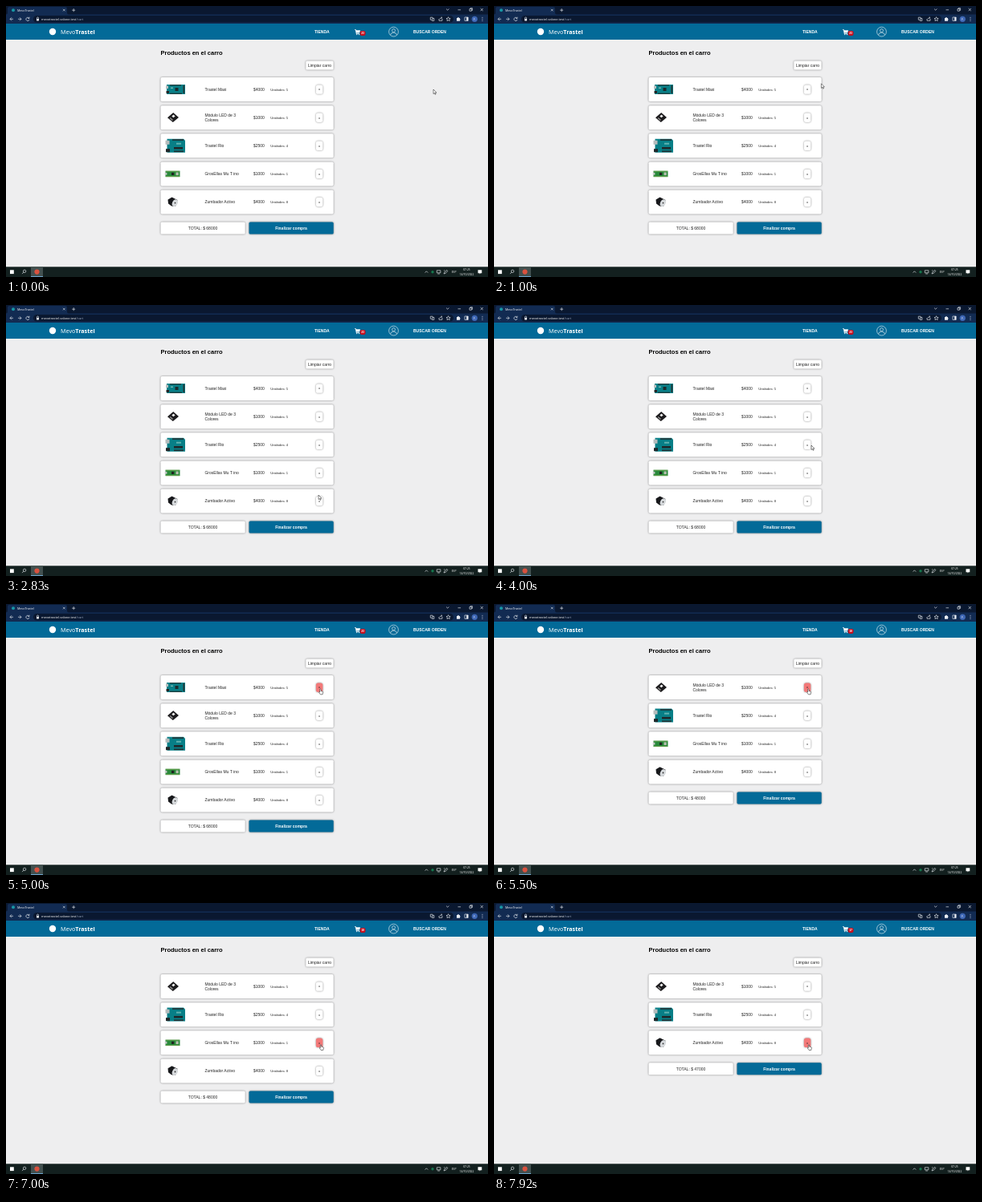
Write an HTML page that moves like this. It is 600x338 px and loops after 8 s.

```html
<!DOCTYPE html>
<html lang="es">
<head>
<meta charset="utf-8">
<title>Carro</title>
<style>
  html, body { margin: 0; height: 100%; overflow: hidden; background: #eeeeef; }
  svg { display: block; width: 100vw; height: 100vh; font: 5px "Liberation Sans", Arial, sans-serif; }
  text { white-space: pre; }
  .ui { font-family: "Open Sans", "Noto Sans", sans-serif; font-size: 3.7px; fill: #fff; }
  .bold { font-weight: 700; }
  .mid { text-anchor: middle; }
  .card { fill: #fff; filter: drop-shadow(0 0 .9px #0007); }
  .line { fill: none; stroke: #e8ecf2; stroke-width: .65; }
</style>
</head>
<body>
<svg viewBox="0 0 600 338">
  <rect width="600" height="338" fill="#eeeeef"/>

  <!-- browser -->
  <rect width="600" height="11" fill="#0a1830"/>
  <path d="M0 10.5Q2 10.5 2 8.5V3Q2 1 4 1H74Q76 1 76 3V8.5Q76 10.5 78 10.5H600V22H0Z" fill="#122b52"/>
  <rect x="34" y="12" width="523" height="8.6" rx="4.3" fill="#0a1830"/>
  <circle cx="9" cy="5.2" r="2" fill="#1896a5"/>
  <text class="ui" x="14" y="6.6">MevoTrastel</text>
  <text class="ui" x="44" y="17.7" font-size="4" style="font-size:4px">mevotrastel.volane.test<tspan fill="#9aa7bd">/cart</tspan></text>
  <g class="line">
    <path d="M71 3.8l2.6 2.6m0-2.6l-2.6 2.6M82.2 5.2h4m-2-2v4"/>
    <path d="M548 3.6l1.7 1.6 1.7-1.6M562.5 4.8h3.6M577 3.6h2.6v2.6H577zM578 3.5v-.8h2.6v2.7h-.9M590.7 3l3.2 3.2m0-3.2l-3.2 3.2"/>
    <path d="M9 16.3H5m2-2l-2 2 2 2M15 16.3h4m-2-2l2 2-2 2M28.6 15.1a2.1 2.1 0 1 0 .4 1.8M29 13.7v1.8h-1.8"/>
    <path d="M38.5 16v-1a1 1 0 0 1 2 0v1"/>
    <path d="M528.3 14.2h2.7v3h-2.7zM531 15.4h1.9v3h-3M539 16v2.3h4V16M540 16.4q.3-1.8 2.8-1.8m-1-1.1l1.2 1.1-1.2 1.1"/>
    <path d="M550.6 13.7l.8 1.7 1.8.2-1.4 1.2.4 1.8-1.6-.9-1.6.9.4-1.8-1.4-1.2 1.8-.2z"/>
    <path d="M571 14h4.2v4.4H571z"/>
  </g>
  <g fill="#e8ecf2">
    <rect x="38" y="15.9" width="3" height="2.5" rx=".4"/>
    <path d="M561 14.9h1.1a.9.9 0 0 1 1.8 0h1.1v1.2a.9.9 0 0 1 0 1.6v1h-4z"/>
    <rect x="573.2" y="14" width="2" height="4.4"/>
    <circle cx="593" cy="14.3" r=".5"/><circle cx="593" cy="16.3" r=".5"/><circle cx="593" cy="18.3" r=".5"/>
  </g>
  <circle cx="583.3" cy="16.3" r="3.6" fill="#3e67b5"/>
  <text class="ui mid" x="583.4" y="17.6">F.</text>

  <!-- site header -->
  <rect y="22" width="600" height="20" fill="#036a98"/>
  <circle cx="58" cy="32" r="4.2" fill="#fff"/>
  <text class="ui" x="68" y="34.6" style="font-size:7.2px">Mevo<tspan class="bold">Trastel</tspan></text>
  <g class="bold" fill="#fff">
    <text x="384" y="33.9">TIENDA</text>
    <text x="507" y="33.9">BUSCAR ORDEN</text>
  </g>
  <path d="M434 29.2h1.6l.3 1h5.1l-.9 3.3h-3.7l.2.8h3.4v.7h-4.1l-1-5.1H434z" fill="#fff"/>
  <circle cx="436.8" cy="35.6" r=".7" fill="#fff"/><circle cx="439.6" cy="35.6" r=".7" fill="#fff"/>
  <rect x="440.7" y="31" width="6.8" height="6" rx="2" fill="#c80d1c"/>
  <text id="badge" class="mid bold" x="444.1" y="35.3" fill="#fff" style="font-size:3.5px"></text>
  <g class="line" stroke="#fff">
    <circle cx="482.5" cy="32.1" r="5.9"/>
    <circle cx="482.5" cy="30.6" r="2"/>
    <path d="M478.5 36.2q.4-3 4-3t4 3"/>
  </g>

  <!-- cart -->
  <text class="bold" x="192.5" y="60.6" style="font-size:7.5px">Productos en el carro</text>
  <rect class="card" x="373.3" y="68.5" width="34.3" height="11" rx="1.6"/>
  <text class="mid" x="390.5" y="75.7" fill="#222">Limpiar carro</text>
  <g id="rows"></g>
  <g id="footer">
    <rect class="card" x="192.5" y="94.5" width="105.2" height="15" rx="1.6"/>
    <text id="total" class="mid" x="245" y="103.8" fill="#222"></text>
    <rect class="card" x="302.5" y="94.5" width="105.2" height="15" rx="1.6" style="fill:#036a98"/>
    <text class="mid bold" x="355" y="103.8" fill="#fff">Finalizar compra</text>
  </g>

  <!-- taskbar -->
  <rect y="325.3" width="600" height="12.7" fill="#13201f"/>
  <rect x="31" y="325.3" width="15" height="12.7" fill="#42504f"/>
  <rect x="31" y="337.2" width="15" height=".8" fill="#76b9ed"/>
  <rect x="5" y="329.3" width="4.8" height="4.8" fill="#fff"/>
  <circle cx="38.5" cy="331.6" r="3.1" fill="#d9523f"/>
  <circle cx="531" cy="331.7" r="1.7" fill="#14764d"/>
  <g class="line">
    <circle cx="23.1" cy="330.8" r="1.7"/>
    <path d="M21.9 332.1l-1.9 2M521.6 332.6l1.8-1.8 1.8 1.8M536.3 329.8h4.6v3h-4.6zM537.3 334h2.6M545 334l1-2.1 2.8-2.5 1.1 1.2-2.7 2.6zM545 330.3l1.3-.6"/>
  </g>
  <path d="M587.5 329.3h4.8v4h-1.7l-1 1.2v-1.2h-2.1z" fill="#fff"/>
  <text class="ui" x="554.7" y="333" style="font-size:3.4px">ESP</text>
  <g class="ui mid" style="font-size:3.4px">
    <text x="573.5" y="330.3">07:25</text>
    <text x="573.5" y="335.8">14/10/2022</text>
  </g>

  <g id="pointer" stroke="#111" stroke-width=".5" stroke-linejoin="round" fill="#fff">
    <path id="arrow" d="M0 0V5.6L1.3 4.4 2.2 6.4 3.1 6 2.2 4.1H4Z"/>
    <path id="hand" d="M-.7.5Q0-.4.7.5V2.7L2.9 3.2Q3.5 3.4 3.4 4.2L2.8 7H0L-1.8 4.4Q-1.6 3.5-.7 4.2Z"/>
  </g>
</svg>

<script>
const $ = id => document.getElementById(id);
const LOOP = 8000, RATE = 12, PITCH = 35.1;

// Simple pictures, centred on the row's middle line
const box = (x, y, w, h, fill) => `<rect x="${x}" y="${y}" width="${w}" height="${h}" fill="${fill}"/>`;
const art = {
  long: box(200, -6, 23, 12, '#087f87') + box(199, -4.5, 3, 3.5, '#b9c0c0') + box(199.5, 2, 3.5, 2.8, '#222') +
    box(204, -5.8, 14, 1.2, '#243333') + box(204, 4.6, 15, 1.2, '#243333') + box(220.5, -5, 1.7, 10, '#243333') +
    box(210.5, -2, 4, 4, '#1c2a2c') + box(205, -2.5, 3, 1.5, '#72b5b2'),
  led: '<path d="M201 .2L208.2-6 215 0 207.8 6Z" fill="#1b1a1c"/>' +
    '<path d="M206.3-1.6l2.2-1.9 2.1 1.8-2.2 1.9z" fill="#f4f4f4"/><path d="M203.5 1l1.2-1 3.4 3-1.2 1z" fill="#8b8b8b"/>',
  board: '<path d="M200.5-8.5H221L223-6.5V8.5H200.5Z" fill="#087f87"/>' + box(198.5, -6.5, 5, 5, '#b5bcbc') +
    box(199, 4, 5, 4, '#20282a') + box(207, -8, 14, 1.6, '#203033') + box(209, 6.3, 12, 1.6, '#203033') +
    box(209, 1.8, 11, 2.5, '#1f2729') + box(212, -3.5, 6, 2, '#5fb3b0'),
  stick: box(198.5, -3.7, 18, 7.6, '#2a8a3c') + box(197.8, -1.4, 2.6, 2.8, '#c4c8c5') + box(206, -1.5, 3.2, 3.2, '#1f2420') +
    box(211.5, -1.8, 3.2, 3.6, '#b8bfae') +
    [-3.5, 2.9].map(y => `<path d="M199 ${y + .4}h17" stroke="#d9c56b" stroke-width=".7" stroke-dasharray=".5 .5"/>`).join(''),
  buzzer: '<path d="M201.5-3L206.5-6 213.5-2.5 211 5.5 206 5 202 2Z" fill="#17181b"/>' +
    '<ellipse cx="210.3" cy="1.3" rx="3.3" ry="4.6" transform="rotate(25 210.3 1.3)" fill="#d7dadd"/><circle cx="210.5" cy="1.2" r=".9" fill="#333"/>',
};

const items = [
  { name: ['Trastel Maxi'], price: 4000, units: 5, pic: 'long', gone: 66 },
  { name: ['Módulo LED de 3', 'Colores'], price: 1000, units: 5, pic: 'led' },
  { name: ['Trastel Rio'], price: 2500, units: 4, pic: 'board' },
  { name: ['GrosEllas Mu T ino'], price: 1000, units: 1, pic: 'stick', gone: 94 },
  { name: ['Zumbador Activo'], price: 4000, units: 8, pic: 'buzzer' },
];

$('rows').innerHTML = items.map(({ name, price, units, pic }) => `<g fill="#222">
  <rect class="card" x="192.5" y="-14.9" width="215.2" height="30" rx="1.8"/>${art[pic]}
  ${name.map((s, i) => `<text x="247.4" y="${1.8 + (i - (name.length - 1) / 2) * 5.8}">${s}</text>`).join('')}
  <text x="308" y="1.8">$${price}</text>
  <text x="329.2" y="1.5" style="font-size:4.1px">Unidades: ${units}</text>
  <rect class="card" x="385.9" y="-5.6" width="8.4" height="11.4" rx="2.6"/>
  <text class="mid" x="390.1" y="1.4" style="font-size:4.2px">x</text></g>`).join('');
items.forEach((item, i) => {
  item.el = $('rows').children[i];
  item.button = item.el.querySelectorAll('.card')[1];
});

// Pointer path: tick, x, y
const path = [
  [3, 532, 104], [13, 393.5, 96], [16, 391, 104], [17, 390.5, 111], [20, 390.5, 130], [23, 390, 145],
  [34, 389, 237], [36, 389.5, 244], [38, 390.5, 246], [43, 395, 197], [46, 395, 175], [48, 395, 175],
  [52, 393, 140], [57, 391.3, 105.8], [69, 391.3, 105.8], [70, 394, 108], [72, 407, 122],
  [75, 404, 150], [80, 396, 172], [81, 392, 176.5],
];

function pointerAt(tick) {
  const next = path.findIndex(p => p[0] >= tick);
  if (next < 1) return path.at(next).slice(1);
  const [t0, x0, y0] = path[next - 1], [t1, x1, y1] = path[next];
  const k = (tick - t0) / (t1 - t0);
  return [x0 + (x1 - x0) * k, y0 + (y1 - y0) * k];
}

const inCart = tick => items.filter(item => !(tick >= item.gone));

function hoveredSlot(tick) {
  const [x, y] = pointerAt(tick);
  const slot = Math.round((y - 104) / PITCH);
  const inside = x > 385.5 && x < 394.5 && Math.abs(y - 104 - slot * PITCH) < 6;
  return inside && slot < inCart(tick).length ? slot : -1;
}

// Each button fades in or out over four ticks
function glow(slot, tick) {
  let h = 0;
  for (let i = 0; i <= tick; i++) h = Math.min(1, Math.max(0, h + (hoveredSlot(i) === slot ? .25 : -.25)));
  return h;
}

function draw(tick) {
  const cart = inCart(tick);
  items.forEach(item => item.el.style.display = cart.includes(item) ? '' : 'none');
  cart.forEach((item, slot) => {
    item.el.setAttribute('transform', `translate(0 ${104 + slot * PITCH})`);
    item.button.style.fill = `color-mix(in srgb, #f37979 ${glow(slot, tick) * 100}%, #fff)`;
  });
  $('footer').setAttribute('transform', `translate(0 ${cart.length * PITCH - .5})`);
  $('total').textContent = 'TOTAL: $ ' + cart.reduce((sum, i) => sum + i.price * i.units, 0);
  $('badge').textContent = cart.reduce((sum, i) => sum + i.units, 0);

  const over = hoveredSlot(tick) >= 0;
  $('pointer').setAttribute('transform', `translate(${pointerAt(tick)})`);
  $('arrow').style.display = over ? 'none' : '';
  $('hand').style.display = over ? '' : 'none';
}

let last = -1;
function frame() {
  const tick = Math.floor((performance.now() % LOOP + 4) * RATE / 1000) % (LOOP * RATE / 1000);
  if (tick !== last) draw(last = tick);
  requestAnimationFrame(frame);
}
frame();
</script>
</body>
</html>
```
